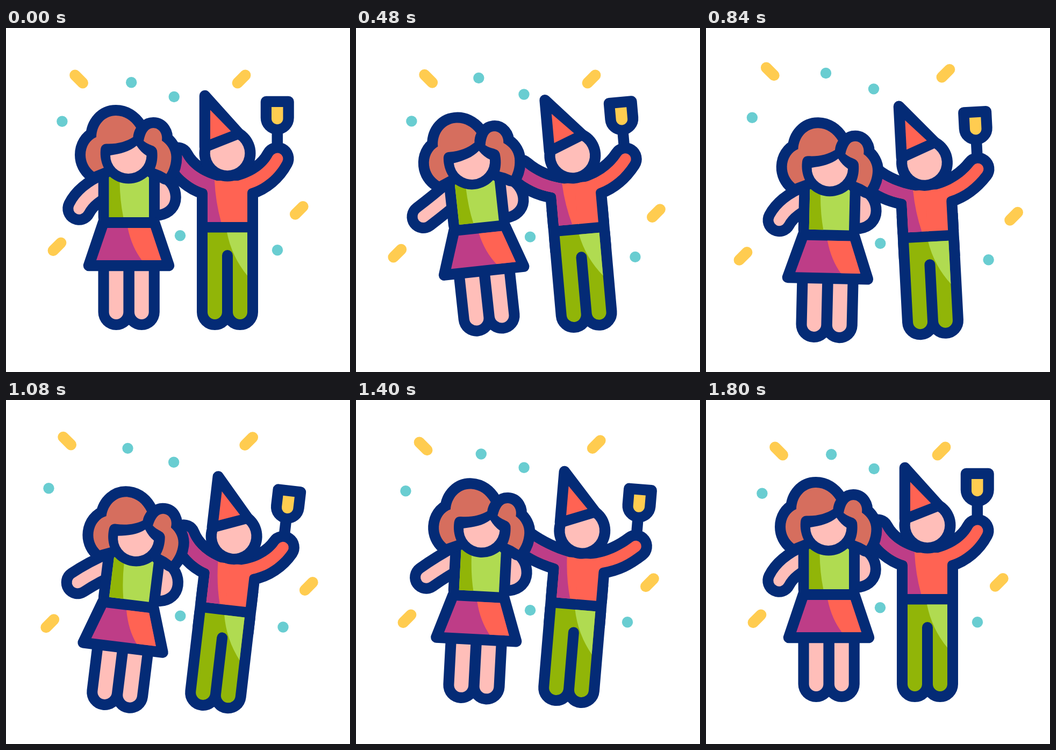
An HTML page with a canvas that plays this animation: 640x640 px, repeating every 1840 ms.

```html
<!DOCTYPE html>
<html lang="en">
<head>
<meta charset="utf-8">
<title>Party couple</title>
<style>
  html, body { margin: 0; width: 100%; height: 100%; overflow: hidden; background: #fff; }
  canvas { display: block; width: 100vmin; height: 100vmin; }
</style>
</head>
<body>
<canvas id="stage" width="640" height="640"></canvas>
<script>
const ctx = document.getElementById('stage').getContext('2d');
const LOOP = 1840, STEP = 40;
const NAVY = '#042b76', SKIN = '#ffbeb9', HAIR = '#d66e5e', RED = '#ff6353', PURPLE = '#be3d87';
const GREEN = '#91b508', LIME = '#b0db51', YELLOW = '#ffcc50', TEAL = '#69cdd1';

const smooth = u => u * u * (3 - 2 * u);

// Eased value along keys [time, value, time, value, ...]
function track(t, keys) {
  if (t <= keys[0]) return keys[1];
  for (let i = 2; i < keys.length; i += 2) {
    if (t < keys[i]) {
      const u = (t - keys[i - 2]) / (keys[i] - keys[i - 2]);
      return keys[i - 1] + (keys[i + 1] - keys[i - 1]) * smooth(u);
    }
  }
  return keys[keys.length - 1];
}

const shape = d => new Path2D(d);
function fill(path, color) {
  ctx.fillStyle = color;
  ctx.fill(path);
}
function line(path, width, color = NAVY) {
  ctx.strokeStyle = color;
  ctx.lineWidth = width;
  ctx.stroke(path);
}
function solid(path, width) {
  fill(path, NAVY);
  line(path, width);
}
function disc(x, y, r, color) {
  ctx.fillStyle = color;
  ctx.beginPath();
  ctx.arc(x, y, r, 0, Math.PI * 2);
  ctx.fill();
}
// Fills a shape, then shades a part of it
function twoTone(path, base, part, tone) {
  fill(path, base);
  ctx.save();
  ctx.clip(path);
  fill(part, tone);
  ctx.restore();
}
function posed(x, y, degrees, drop, draw) {
  ctx.save();
  ctx.translate(x, y + drop);
  ctx.rotate(degrees * Math.PI / 180);
  ctx.translate(-x, -y);
  draw();
  ctx.restore();
}

// x, y, travel x, travel y, start, slant (0 = dot)
const confetti = [
  [95, 406.8, -27.7, 18.8, 80, -1],
  [505, 413.3, 22, 19.2, 80, 0],
  [545.3, 339.3, 27.4, 11, 160, -1],
  [233.2, 101.2, -10.2, -17.3, 160, 0],
  [312.7, 128, -0.7, -15, 240, 0],
  [324, 386.2, 0.3, 16.5, 320, 0],
  [135.6, 95, -22, -19, 400, 1],
  [104.4, 173.8, -25, -9.6, 400, 0],
  [438, 95, 14, -18.8, 480, -1]
];

function drawConfetti(t) {
  for (const [x, y, dx, dy, start, slant] of confetti) {
    const k = track(t, [start, 0, start + 660, 1, start + 1320, 0]);
    const cx = x + dx * k, cy = y + dy * k;
    if (!slant) {
      disc(cx, cy, 10.2, TEAL);
      continue;
    }
    const bar = new Path2D();
    bar.moveTo(cx - 7.2, cy - 7.2 * slant);
    bar.lineTo(cx + 7.2, cy + 7.2 * slant);
    line(bar, 20.4, YELLOW);
  }
}

const boy = {
  pants: shape('M375 380.5H449V528.5A13.5 13.5 0 0 1 422 528.5V423A10 10 0 0 0 402 423V528.5A13.5 13.5 0 0 1 375 528.5Z'),
  pantsLight: shape('M411 375L411 380Q420 426 450 462V375Z'),
  waist: shape('M355 330H469V410H355Z'),
  shade: shape('M388 270V284Q390 325 400.5 362H280V200H388Z'),
  hat: shape('M370 126L433 196L370 221Z'),
  hatFill: shape('M380 152.5L418.5 192L380 207Z'),
  cup: shape('M484 137H525.5V167A20.75 20.75 0 0 1 484 167Z'),
  drink: shape('M494 147H515.5V168.5A10.75 10.75 0 0 1 494 168.5Z'),
  stem: shape('M504.8 185V235')
};

// A raised right sleeve; reach moves the hand, turn lowers the forearm
function sleeve(w, reachX, reachY, turn) {
  const a = (62 - turn * w) * Math.PI / 180;
  const dx = Math.cos(a), dy = -Math.sin(a);
  const px = 505 + reachX * w, py = 243 + reachY * w;
  const nx = dy * 10.5, ny = -dx * 10.5;
  const ux = px + nx, uy = py + ny, lx = px - nx, ly = py - ny;
  const p = new Path2D();
  p.moveTo(412, 284);
  p.lineTo(432, 284);
  p.bezierCurveTo(462, 276 + 3 * w, ux - dx * 24, uy - dy * 24, ux, uy);
  p.arc(px, py, 10.5, Math.atan2(ny, nx), Math.atan2(-ny, -nx));
  p.bezierCurveTo(lx - dx * 28, ly - dy * 28, 479 + 3 * w, 291 + w, 455, 298.5);
  p.quadraticCurveTo(449, 300.5, 449, 307);
  p.lineTo(449, 361);
  p.lineTo(411, 361);
  p.lineTo(411, 284);
  p.closePath();
  return p;
}

function shirtPath(w) {
  const shirt = sleeve(w, 8.8, 10.8, 20);
  shirt.addPath(sleeve(w, 13, 20, 32), new DOMMatrix([-1, 0, 0, 1, 824, 0]));
  shirt.addPath(shape('M409 284H415V361H409Z'));
  return shirt;
}

function drawBoy(w) {
  const shirt = shirtPath(w);
  const whole = new Path2D();
  whole.rect(280, 200, 280, 170);
  solid(shirt, 40);
  solid(boy.pants, 40);
  fill(boy.waist, NAVY);
  ctx.save();
  ctx.translate(8.8 * w, 10.8 * w);
  line(boy.stem, 20.5);
  solid(boy.cup, 20.5);
  fill(boy.drink, YELLOW);
  ctx.restore();
  // The mirrored halves wind in opposite ways, so each half is painted apart
  const right = sleeve(w, 8.8, 10.8, 20);
  const left = new Path2D();
  left.addPath(sleeve(w, 13, 20, 32), new DOMMatrix([-1, 0, 0, 1, 824, 0]));
  twoTone(left, RED, boy.shade, PURPLE);
  fill(right, RED);
  twoTone(boy.pants, GREEN, boy.pantsLight, LIME);
  disc(412, 233, 52.5, NAVY);
  disc(412, 233, 32.3, SKIN);
  solid(boy.hat, 20.5);
  fill(boy.hatFill, RED);
}

const girl = {
  legs: shape('M205 440V528.5M252.3 440V528.5'),
  skirt: shape('M181 362H276L303 442H154Z'),
  skirtFill: shape('M188.5 372H269L289 432H168Z'),
  skirtRed: shape('M226 370L226.5 372Q234 408 253.5 433H300V370Z'),
  torso: shape('M191.7 268H266V352H191.7Z'),
  torsoDark: shape('M185 265H211.5V285Q212 322 218.5 353H185Z'),
  rightArm: shape('M270 284L285 285.5C298 289 305.8 302 305.8 315C305.8 327 298 335.5 285 338L270 339Z'),
  hair: shape('M242 185.5C233 171.5 220 163 204.5 163C184 163 168.5 180 168 203C156 208 148 221 148 236C148 249 154 260 163.5 267.5L182 260C177 250 175 238 176 227C176.5 219 181 215 188 215.5C208 216 224 211 236.5 203Q237 194 242 185.5Z'),
  lock: shape('M256 210C259 195 264 186 274 186C285 186 292 197 290 209.5C301 217 307.5 228 307.5 240C307.5 252 304 263 298.5 271.5Q288 265 277 261.5C281 252 282.5 240 281 228C278 217 268 220 256 210Z'),
  face: shape('M194 237C213 234 230 230 243 219Q251 231 261.5 237.5A33.5 33.5 0 0 1 194 237Z')
};

function drawGirl(w) {
  const arm = new Path2D();
  arm.moveTo(192, 290 - 2 * w);
  arm.quadraticCurveTo(150 + 12 * w, 308 + w, 136 - 9 * w, 336 - 6 * w);

  line(girl.legs, 67);
  line(arm, 61.5);
  solid(girl.rightArm, 40);
  line(arm, 21.5, SKIN);
  fill(girl.rightArm, SKIN);
  line(girl.legs, 26.8, SKIN);

  line(girl.torso, 40);
  solid(girl.skirt, 20.5);
  twoTone(girl.skirtFill, PURPLE, girl.skirtRed, RED);
  twoTone(girl.torso, LIME, girl.torsoDark, GREEN);

  disc(228, 236, 53.5, NAVY);
  solid(girl.hair, 40);
  solid(girl.lock, 40);
  fill(girl.hair, HAIR);
  fill(girl.lock, HAIR);
  fill(girl.face, SKIN);
}

function render(t) {
  ctx.fillStyle = '#fff';
  ctx.fillRect(0, 0, 640, 640);
  ctx.lineCap = ctx.lineJoin = 'round';
  drawConfetti(t);

  const boyTilt = track(t, [110, 0, 680, -7, 1140, 7.3, 1800, 0]);
  const boyDrop = track(t, [280, 0, 1020, 20.3, 1760, 0]);
  const boyArms = track(t, [280, 0, 680, 1, 1080, 0, 1420, 1, 1790, 0]);
  posed(412, 338, boyTilt, boyDrop, () => drawBoy(boyArms));

  const girlTilt = track(t, [10, 0, 600, -6.9, 1030, 7.1, 1700, 0]);
  const girlDrop = track(t, [180, 0, 845, 23.7, 895, 23.7, 1560, 0]);
  const girlArm = track(t, [10, 0, 480, 1, 860, 0, 1230, 1, 1710, 0]);
  posed(229, 352, girlTilt, girlDrop, () => drawGirl(girlArm));
}

const begin = performance.now();
function tick() {
  const ms = (performance.now() - begin) % LOOP;
  const t = Math.floor(ms / STEP) * STEP;
  render(t < 2 * STEP ? 0 : t);
  requestAnimationFrame(tick);
}
tick();
</script>
</body>
</html>
```
